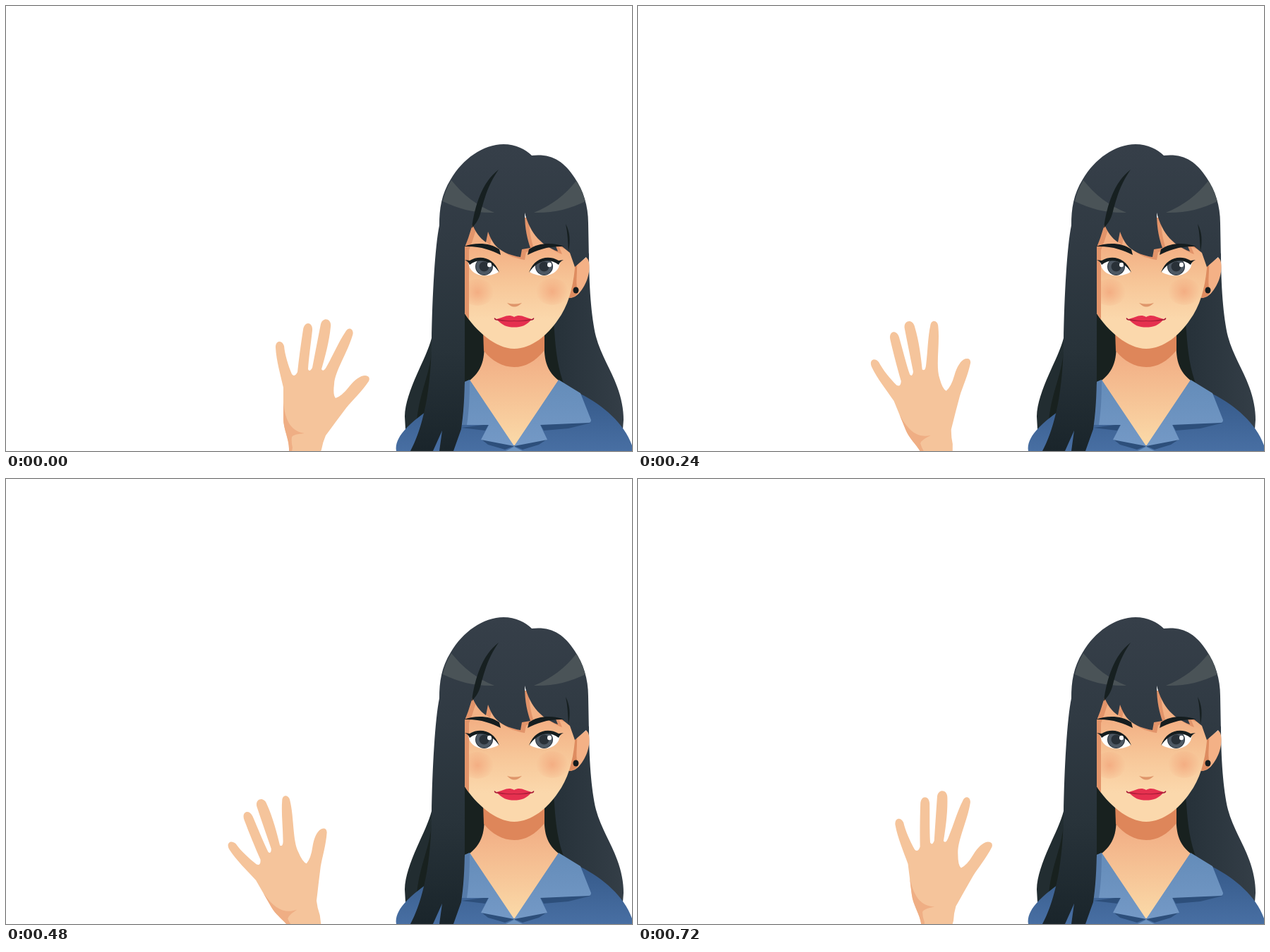
These frames come from a looping animation (887x631 px, 0.8 s). An HTML page with a canvas:

```html
<!DOCTYPE html>
<html lang="en">
<head>
<meta charset="utf-8">
<title>Waving woman</title>
<style>
html, body { margin: 0; width: 100%; height: 100%; overflow: hidden; background: #fff; }
canvas { display: block; }
</style>
</head>
<body>
<canvas id="stage" width="887" height="631"></canvas>
<script>
const ctx = document.getElementById('stage').getContext('2d');
const LOOP = 800, STEP = 80;
const PIVOT = { x: 426, y: 628 };
const SWING = [0, 7.1, 14.5, 22.2, 29.8, 36];

const FACE = 'M650 300H803L806 372C803 402 796 426 782 445C768 466 745 486 720 486C694 486 665 460 650 436Z';
const EYE = 'M655 364C664 354 688 353 698 377C688 384 665 386 657 371Z';
const HAIR = 'M603 476C604 410 608 340 614 311C614 287 617 267 630 246C647 217 676 196 705 196C722 196 736 203 745 212C772 209 790 219 806 244C818 262 825 283 825 308L826 361L822 356L806 370L799 350L788 341L778 338L782 348C760 340 743 324 735 293C735 317 739 331 743 343L731 345L729 356C716 354 706 350 697 343C690 337 686 328 683 320L680 335C671 329 665 320 661 310L655 329L650 342V520C650 555 648 580 645 600L634 631H614L618 602L605 631H573C586 607 602 560 603 476Z';

function fill(d, color) {
  ctx.fillStyle = color;
  ctx.fill(new Path2D(d));
}

function gradient(x0, y0, x1, y1, ...colors) {
  const g = ctx.createLinearGradient(x0, y0, x1, y1);
  colors.forEach((c, i) => g.addColorStop(i / (colors.length - 1), c));
  return g;
}

function ellipse(x, y, rx, ry, color) {
  ctx.fillStyle = color;
  ctx.beginPath();
  ctx.ellipse(x, y, rx, ry, 0, 0, Math.PI * 2);
  ctx.fill();
}

function clipped(d, draw) {
  ctx.save();
  ctx.clip(new Path2D(d));
  draw();
  ctx.restore();
}

// Draws once as is and once mirrored on the axis of the face
function bothSides(draw) {
  draw();
  ctx.save();
  ctx.translate(1440, 0);
  ctx.scale(-1, 1);
  draw();
  ctx.restore();
}

const hairTone = gradient(0, 196, 0, 631, '#363f49', '#303a43', '#28333a', '#1a252b');
const faceTone = gradient(0, 345, 0, 445, '#f3b185', '#f7c799', '#fbd8ac');
const neckTone = gradient(0, 500, 0, 615, '#f2b086', '#fad7a6');
const shirtTone = gradient(0, 550, 0, 631, '#365a8a', '#486fa3');
const collarTone = gradient(0, 530, 0, 624, '#648cb9', '#7499c6');
const backTone = gradient(782, 0, 875, 0, '#27323a', '#343e47');

function drawBackHair() {
  fill('M755 440H800V560H755Z', '#18211f');
  fill('M775 440L826 350C826 395 829 440 836 469C843 495 857 515 866 540C872 556 875 572 875 587L874 600L792 540C782 515 779 490 777 460Z', backTone);
  fill('M603 471C596 500 566 545 565 582L566 600L610 590V471Z', '#222d31');
  fill('M603 490C600 525 585 550 582 590L680 560V440L648 425Z', '#18211f');
}

function drawBody() {
  fill('M553 631C550 612 570 593 598 573L650 536L720 610L786 532L814 550C846 566 876 592 887 623V631Z', shirtTone);
  fill('M677 465C679 495 678 514 657 531L720 625L783 531C762 514 762 495 763 465Z', neckTone);
  fill('M676 460H763V488C750 504 736 512 720 512C704 512 688 503 677 489Z', '#de865a');

  fill('M757 593L829 591L797 599L762 602Z', '#2d4f7b');
  fill('M645 598L684 593L679 602Z', '#2d4f7b');
  fill('M673 614L720 623L767 614L755 622L732 629L720 624L707 629L683 622Z', '#2d4f7b');
  fill('M708 631L720 625L732 631Z', '#6c93c0');

  fill('M783 530L814 549L829 587Q829 591 825 591L757 594L767 615L720 624Z', collarTone);
  fill('M657 530L720 624L673 615L684 594H645L650 533Z', collarTone);
  fill('M650 533L657 530C657 553 656 574 653 594H645Z', '#567ba9');
}

function drawCheek(x, y) {
  const g = ctx.createRadialGradient(x, y, 0, x, y, 23);
  g.addColorStop(0, 'rgba(242,164,122,.75)');
  g.addColorStop(1, 'rgba(242,164,122,0)');
  ellipse(x, y, 23, 19, g);
}

function drawFace() {
  fill('M800 372L823 356C830 366 826 387 818 399C812 409 806 414 798 414Z', '#f4b186');
  fill('M801 366L809 364C810 378 806 396 811 406Q806 414 798 414Z', '#de8c60');

  fill(FACE, faceTone);
  drawCheek(668, 406);
  drawCheek(774, 405);
  // The fringe casts a shadow down and to the right
  clipped(FACE, () => {
    ctx.translate(6, 4);
    fill(HAIR, '#e2946a');
  });

  fill('M710 421Q720 424 731 421Q720 432 710 421Z', '#df966b');
  fill('M695 444C705 442 711 436 720 441C729 436 735 442 745 444C738 453 730 455.500 720 455.500C710 455.500 703 453 695 444Z', '#e5304f');
  fill('M692 442Q695 445 700 444.500Q710 447 720 446Q730 447 740 444.500Q745 445 748 442Q749 444 746 445.500Q732 448 720 447Q708 448 694 445.500Q691 444 692 442Z', '#a91d38');
}

function drawEyes() {
  bothSides(() => {
    fill(EYE, '#fff');
    clipped(EYE, () => {
      ellipse(677.5, 369.5, 12.5, 12.5, '#2a333c');
      ellipse(677.5, 369.5, 11.5, 11.5, '#4d5863');
      ellipse(677.5, 369.5, 7, 7, '#293138');
    });
    fill('M650 360L657 361C670 353 691 355 699 378C688 361 670 356 657 367Q655 362 650 360Z', '#151d1f');
  });
  ellipse(685, 367, 3, 3.2, '#fff');
  ellipse(770, 367, 3, 3.2, '#fff');
}

function drawFrontHair() {
  fill(HAIR, hairTone);
  const shine = 'M631 247C625 257 621 267 619 277C641 288 666 294 692 293C667 283 648 268 631 247Z';
  clipped(HAIR, () => bothSides(() => fill(shine, '#4a5357')));
  fill('M698 232C682 255 678 274 673 291C670 304 665 309 660 315C664 283 675 249 698 232Z', '#172021');
  fill('M793 309C799 320 800 333 797 348C796 335 796 322 793 309Z', '#172021');
  ellipse(807.5, 403, 4, 4.5, '#151c1e');
}

function drawBrows() {
  bothSides(() => fill('M649 341C664 335 686 335 699 345L701 353C688 346 671 340 649 341Z', '#151d1f'));
}

function drawHand(degrees) {
  ctx.save();
  ctx.translate(PIVOT.x, PIVOT.y);
  ctx.rotate(-degrees * Math.PI / 180);
  ctx.translate(-PIVOT.x, -PIVOT.y);
  fill('M382 484C382 474 391 473 394 482C395 494 400 510 405 522Q409 527 413 519C415 500 418 478 421 459C423 446 435 448 434 460C432 478 429 499 428 515Q430 520 434 513C438 492 442 471 446 451C449 440 462 443 460 455C458 476 452 498 447 515Q450 520 455 510C464 494 472 475 481 462C486 453 494 459 491 467C484 491 466 518 465 536Q463 552 467 556Q476 553 486 540C494 530 502 524 509 524Q517 525 514 532C504 547 491 559 482 570L467 590Q459 601 453 609Q449 618 447 629L442 641L432 670L401 690V631C402 615 393 601 393 585V541C389 523 383 503 382 484Z', '#f5c49b');
  fill('M393 562C396 592 406 603 423 606Q407 607 405 611Q404 619 406 626L402 650H401V631C402 615 393 601 393 585Z', '#efae84');
  ctx.restore();
}

function render() {
  const tick = Math.floor(performance.now() % LOOP / STEP);
  const pose = tick > 5 ? 10 - tick : tick;
  ctx.fillStyle = '#fff';
  ctx.fillRect(0, 0, 887, 631);
  drawHand(SWING[pose]);
  drawBackHair();
  drawBody();
  drawFace();
  drawEyes();
  drawFrontHair();
  drawBrows();
  requestAnimationFrame(render);
}

render();
</script>
</body>
</html>
```
